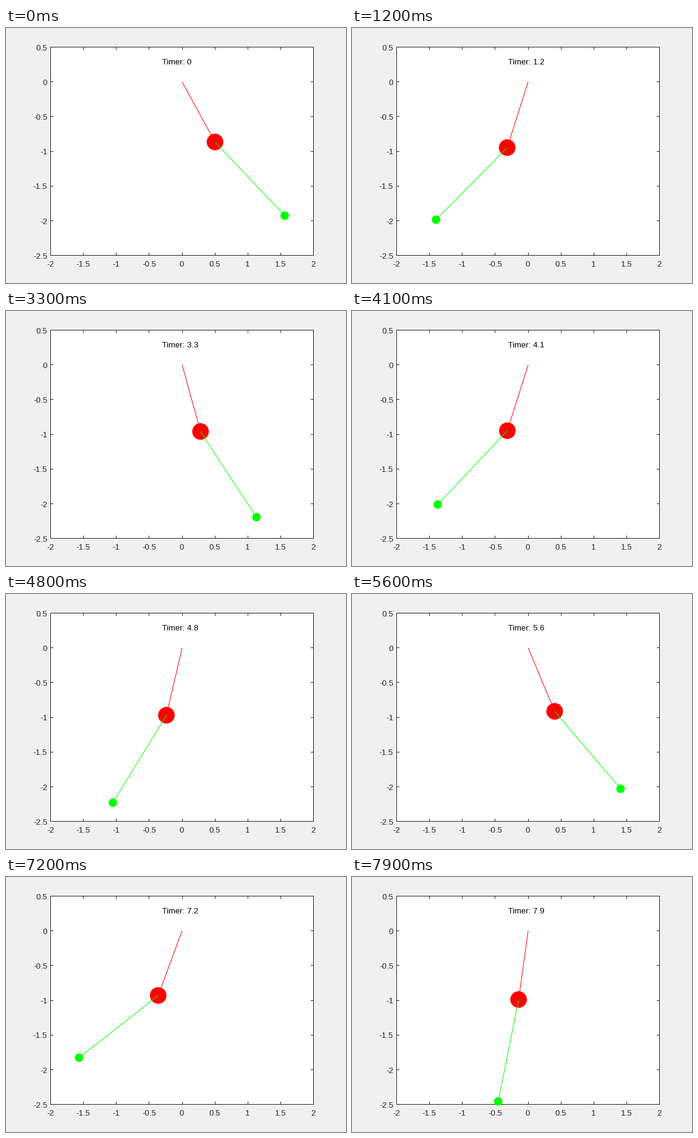
These frames come from a looping animation (560 px wide and 420 px high, 8 s). A matplotlib script:

```python
import numpy as np
import matplotlib.pyplot as plt
from matplotlib.animation import FuncAnimation
from matplotlib.patches import Circle, Rectangle

plt.rcParams["font.family"] = "Liberation Sans"

W, H, DPI = 560, 420, 100
FRAMES, STEP = 80, 100
HELD = {52, 54, 59, 62}          # ticks that repeat the previous picture
L1, L2, M1, M2, G = 1, 1.5, 2, 1, 9.8
INK = "#262626"
PT = 72 / DPI                    # points per pixel

# Dormand-Prince pair with its dense output
A = [[1/5],
     [3/40, 9/40],
     [44/45, -56/15, 32/9],
     [19372/6561, -25360/2187, 64448/6561, -212/729],
     [9017/3168, -355/33, 46732/5247, 49/176, -5103/18656],
     [35/384, 0, 500/1113, 125/192, -2187/6784, 11/84]]
E = np.array([71/57600, 0, -71/16695, 71/1920, -17253/339200, 22/525, -1/40])
DENSE = np.array([[1, -183/64, 37/12, -145/128],
                  [0, 0, 0, 0],
                  [0, 1500/371, -1000/159, 1000/371],
                  [0, -125/32, 125/12, -375/64],
                  [0, 9477/3392, -729/106, 25515/6784],
                  [0, -11/7, 11/3, -55/28],
                  [0, 3/2, -4, 5/2]])


def slope(s):
    a, b, wa, wb = s
    d = a - b
    den = 2 * M1 + M2 - M2 * np.cos(2 * d)
    acc_a = (-G * (2 * M1 + M2) * np.sin(a) - M2 * G * np.sin(a - 2 * b)
             - 2 * np.sin(d) * M2 * (wb**2 * L2 + wa**2 * L1 * np.cos(d))) / (L1 * den)
    acc_b = 2 * np.sin(d) * ((M1 + M2) * (wa**2 * L1 + G * np.cos(a))
                             + wb**2 * L2 * M2 * np.cos(d)) / (L2 * den)
    return np.array([wa, wb, acc_a, acc_b])


def solve(s, times, rtol=1e-3, floor=1e-3):
    """Adaptive integration, sampled at the given times."""
    out, t, k0 = [], 0.0, slope(s)
    rate = np.max(np.abs(k0) / np.maximum(np.abs(s), floor)) / (0.8 * rtol**0.2)
    h = min(1.0, 1 / rate)
    while len(out) < len(times):
        failed = False
        while True:
            k = [k0]
            for row in A:
                new = s + h * np.dot(row, k)
                k.append(slope(new))
            size = np.maximum(np.maximum(np.abs(s), np.abs(new)), floor)
            err = h * np.max(np.abs(E @ np.array(k)) / size)
            if err <= rtol:
                break
            h *= 0.5 if failed else max(0.1, 0.8 * (rtol / err)**0.2)
            failed = True
        while len(out) < len(times) and times[len(out)] <= t + h:
            u = (times[len(out)] - t) / h
            out.append(s + h * np.array(k).T @ (DENSE @ u ** np.arange(1, 5)))
        t, s, k0 = t + h, new, k[-1]
        if not failed:
            h = min(1.0, h / max(0.2, 1.25 * (err / rtol)**0.2))
    return out


LEFT, RIGHT, TOP, BOTTOM = 73.5, 506.5, 31.5, 374.5


def px(x):
    return 290.1 + (RIGHT - LEFT) / 4 * x


def py(y):
    return TOP + (BOTTOM - TOP) / 3 * (0.5 - y)


def crisp(v):
    return np.floor(v) + 0.5


states = solve(np.array([np.pi / 6, np.pi / 4, 0, 0]), np.arange(FRAMES) * STEP / 1000)

fig = plt.figure(figsize=(W / DPI, H / DPI), dpi=DPI, facecolor="#f0f0f0")
ax = fig.add_axes([0, 0, 1, 1])
ax.set(xlim=(0, W), ylim=(H, 0))
ax.axis("off")


def label(x, y, s, ha, color=INK):
    return ax.text(x, y, s, ha=ha, va="baseline", color=color, fontsize=13.33 * PT)


def line(xs, ys, color, z=1):
    return ax.plot(xs, ys, color=color, lw=PT, zorder=z, snap=False,
                   solid_capstyle="butt")[0]


ax.add_patch(Rectangle((LEFT, TOP), RIGHT - LEFT, BOTTOM - TOP, fc="white",
                       ec=INK, lw=PT, snap=False, zorder=0))
for v in np.arange(-2, 2.1, 0.5):
    x = min(crisp(px(v)), RIGHT)
    line([x, x], [BOTTOM, BOTTOM - 4.5], INK)
    line([x, x], [TOP, TOP + 4.5], INK)
    label(px(v) - 0.5, 393, f"{v:g}", "center")
for v in np.arange(-2.5, 0.6, 0.5):
    y = crisp(py(v))
    line([LEFT, LEFT + 4.5], [y, y], INK)
    line([RIGHT, RIGHT - 4.5], [y, y], INK)
    label(68, py(v) + 5.3, f"{v:g}", "right")

rod1 = line([], [], "#ff0000", 2)
bob1 = ax.add_patch(Circle((0, 0), 13.67, color="#ff0000", lw=0, zorder=3))
rod2 = line([], [], "#00ff00", 4)
bob2 = ax.add_patch(Circle((0, 0), 7, color="#00ff00", lw=0, zorder=5))
timer = label(257, 60, "", "left", "black")


def draw(i):
    if i in HELD:
        i -= 1
    a, b = states[i][:2]
    x1, y1 = L1 * np.sin(a), -L1 * np.cos(a)
    x2, y2 = x1 + L2 * np.sin(b), y1 - L2 * np.cos(b)
    p0, p1, p2 = [(px(x), py(y)) for x, y in ((0, 0), (x1, y1), (x2, y2))]
    rod1.set_data(*zip(p0, p1))
    rod2.set_data(*zip(p1, p2))
    bob1.center, bob2.center = p1, p2
    timer.set_text(f"Timer: {i * STEP / 1000:.2g}")
    return rod1, bob1, rod2, bob2, timer


anim = FuncAnimation(fig, draw, frames=FRAMES, interval=STEP, repeat=True)
plt.show()
```
